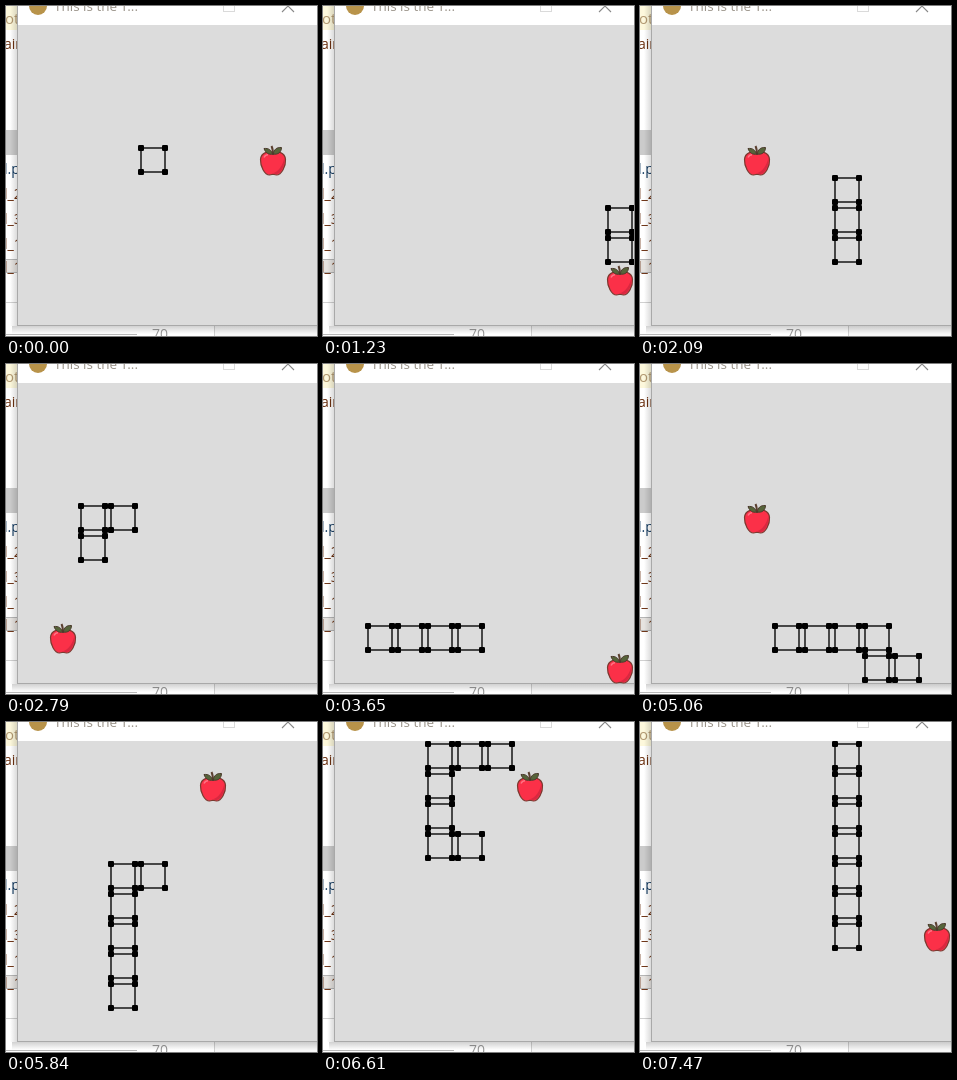
An HTML page that plays this animation: 311x330 px, repeating every 7.64 s.

```html
<!DOCTYPE html>
<html lang="en">
<head>
<meta charset="utf-8">
<title>Snake</title>
<style>
  html, body { margin: 0; width: 100%; height: 100%; overflow: hidden; background: #fff; }
  svg { display: block; width: 311px; height: 330px; }
  text { font-family: "Open Sans", "Noto Sans", sans-serif; }
  .tree { font-size: 14px; fill: #6b3010; }
</style>
</head>
<body>
<svg viewBox="0 0 311 330">
  <defs>
    <linearGradient id="shade">
      <stop offset="0" stop-color="#000" stop-opacity="0"/>
      <stop offset="1" stop-color="#000" stop-opacity=".16"/>
    </linearGradient>
    <linearGradient id="drop" x2="0" y2="1">
      <stop offset="0" stop-color="#000" stop-opacity=".18"/>
      <stop offset="1" stop-color="#000" stop-opacity="0"/>
    </linearGradient>
    <clipPath id="stage"><rect x="12" y="19" width="299" height="301"/></clipPath>
    <g id="cell">
      <rect x="3" y="3" width="24" height="24" fill="none" stroke="#222" stroke-width="1.6"/>
      <path d="M3 3h0M27 3h0M3 27h0M27 27h0" stroke="#000" stroke-width="1"/>
      <g fill="#000">
        <rect width="6" height="6" rx="1.3"/>
        <rect x="24" width="6" height="6" rx="1.3"/>
        <rect y="24" width="6" height="6" rx="1.3"/>
        <rect x="24" y="24" width="6" height="6" rx="1.3"/>
      </g>
    </g>
    <g id="fruit" stroke-linejoin="round">
      <path d="M15 8.5C11 5.5 3 7 2.5 14.5C2.2 21 6.500 30 11.500 30C13.500 30 14 29.300 15 29.300C16 29.300 16.500 30 18.500 30C23.500 30 28 21 27.500 14.500C27 7 19 5.500 15 8.500Z" fill="#fb3048" stroke="#7a3a30" stroke-width="1.2"/>
      <path d="M26.500 12C27.500 20 23 29 18.500 29C16.500 29 16 28.600 14.500 28.500C21 26.500 25 20 26.500 12Z" fill="#d92840"/>
      <path d="M6 12.500C7 10.500 8.500 9.800 10 9.800" fill="none" stroke="#ff7383" stroke-width="1.5"/>
      <path d="M15 10C15 6 14.500 3 13.500 1" fill="none" stroke="#5c4030" stroke-width="2"/>
      <path d="M14.500 9C11 10 7.500 8 6 3.500C10.500 3 13.500 5 14.500 9Z" fill="#56643a" stroke="#4b3a2c"/>
      <path d="M15.500 9C15.500 5 18.500 2 23.500 2.500C23.500 7 20 10 15.500 9Z" fill="#56643a" stroke="#4b3a2c"/>
    </g>
  </defs>

  <!-- editor behind the window -->
  <rect width="311" height="330" fill="#fff"/>
  <rect width="12" height="24" fill="#fdf8dc"/>
  <rect y="124" width="12" height="25" fill="#cbcbcb"/>
  <rect x="-1" y="253.500" width="14" height="13" fill="#e6e3e0" stroke="#b5b5b5"/>
  <text x="-1" y="18" font-size="15" fill="#b39a72">ot</text>
  <g class="tree">
    <text x="-2" y="43">ain</text>
    <text x="-7" y="168" fill="#12395f">d.py</text>
    <text x="-7" y="193">d_2</text>
    <text x="-7" y="218">d_3</text>
    <text x="-7" y="243">d_1</text>
    <text x="-7" y="266">d_1</text>
  </g>
  <path d="M0 296.500H12" stroke="#d0d0d0"/>
  <path d="M0 328.500H131" stroke="#b8b8b8"/>
  <rect x="208" y="320" width="103" height="10" fill="#f7f7f7"/>
  <path d="M208.500 320V330" stroke="#d0d0d0"/>
  <text x="146" y="333" font-size="14" fill="#999">70</text>
  <rect x="4" width="8" height="320" fill="url(#shade)"/>
  <rect x="6" y="320" width="305" height="8" fill="url(#drop)"/>

  <!-- game window -->
  <rect x="11" width="300" height="320" fill="#a9a9a9"/>
  <rect x="12" width="299" height="19" fill="#fff"/>
  <rect x="12" y="19" width="299" height="300" fill="#dcdcdc"/>
  <circle cx="32" cy="0" r="9" fill="#b8934a"/>
  <text x="48" y="4.500" font-size="13.500" fill="#999288">This is the T...</text>
  <rect x="217.500" y="-6.500" width="11" height="12" fill="none" stroke="#dadada"/>
  <path d="M276 6L288 -6M276 -6L288 6" stroke="#888" stroke-width="1.1"/>
  <g clip-path="url(#stage)">
    <use id="apple" href="#fruit"/>
    <g id="snake"></g>
  </g>
</svg>
<script>
const SIZE = 30, LEFT = 12, TOP = 19;
const STEP = { U: [0, -1], D: [0, 1], L: [-1, 0], R: [1, 0] };
const route = "URRRRDRDDD" + "DLLLUUUULLL" + "LDDLDD" + "RRRRRRRRD" +
              "LLULLLLUUUU" + "RULUUURRRDDDDDDD".slice(0, 15);
const apples = [[8, 4], [9, 8], [3, 4], [1, 8], [9, 9], [3, 4], [6, 1], [9, 6]];

// How long each pose stays, in hundredths of a second
const stays = [
  13, 16, 8, 16, 8, 15, 8, 16, 8, 15,
  8, 15, 8, 16, 8, 15, 8, 15, 17,
  15, 8, 15, 8, 15, 8, 15, 8, 16,
  8, 16, 7, 16, 8, 16, 8, 17, 15,
  8, 15, 8, 15, 8, 15, 8, 15, 8, 15,
  8, 16, 8, 15, 8, 16, 8, 15, 15,
  8, 16, 8, 15, 8, 16, 17
];
const same = (a, b) => a && b && a[0] === b[0] && a[1] === b[1];

// The body grows when its tail leaves the place of the last meal.
function play() {
  let body = [[4, 4]], eaten = 0, meal = null;
  const poses = [{ body, apple: apples[0] }];
  for (const key of route) {
    const [x, y] = body[body.length - 1], [dx, dy] = STEP[key];
    const head = [x + dx, y + dy];
    const grows = same(body[0], meal);
    body = [...(grows ? body : body.slice(1)), head];
    if (grows) meal = null;
    if (same(head, apples[eaten])) {
      meal = head;
      eaten++;
    }
    poses.push({ body, apple: apples[eaten] });
  }
  return poses;
}

const poses = play();
const loop = stays.reduce((sum, s) => sum + s, 0) * 10;
const snake = document.getElementById("snake");
const apple = document.getElementById("apple");
const place = ([x, y]) => `x="${LEFT + x * SIZE}" y="${TOP + y * SIZE}"`;
const start = performance.now();
let shown = -1;

function draw() {
  let rest = (performance.now() - start) % loop, i = 0;
  while (rest >= stays[i] * 10) rest -= stays[i++] * 10;
  if (i !== shown) {
    const pose = poses[shown = i];
    snake.innerHTML = pose.body.map(c => `<use href="#cell" ${place(c)}/>`).join("");
    apple.setAttribute("x", LEFT + pose.apple[0] * SIZE);
    apple.setAttribute("y", TOP + pose.apple[1] * SIZE);
  }
  requestAnimationFrame(draw);
}
draw();
</script>
</body>
</html>
```
